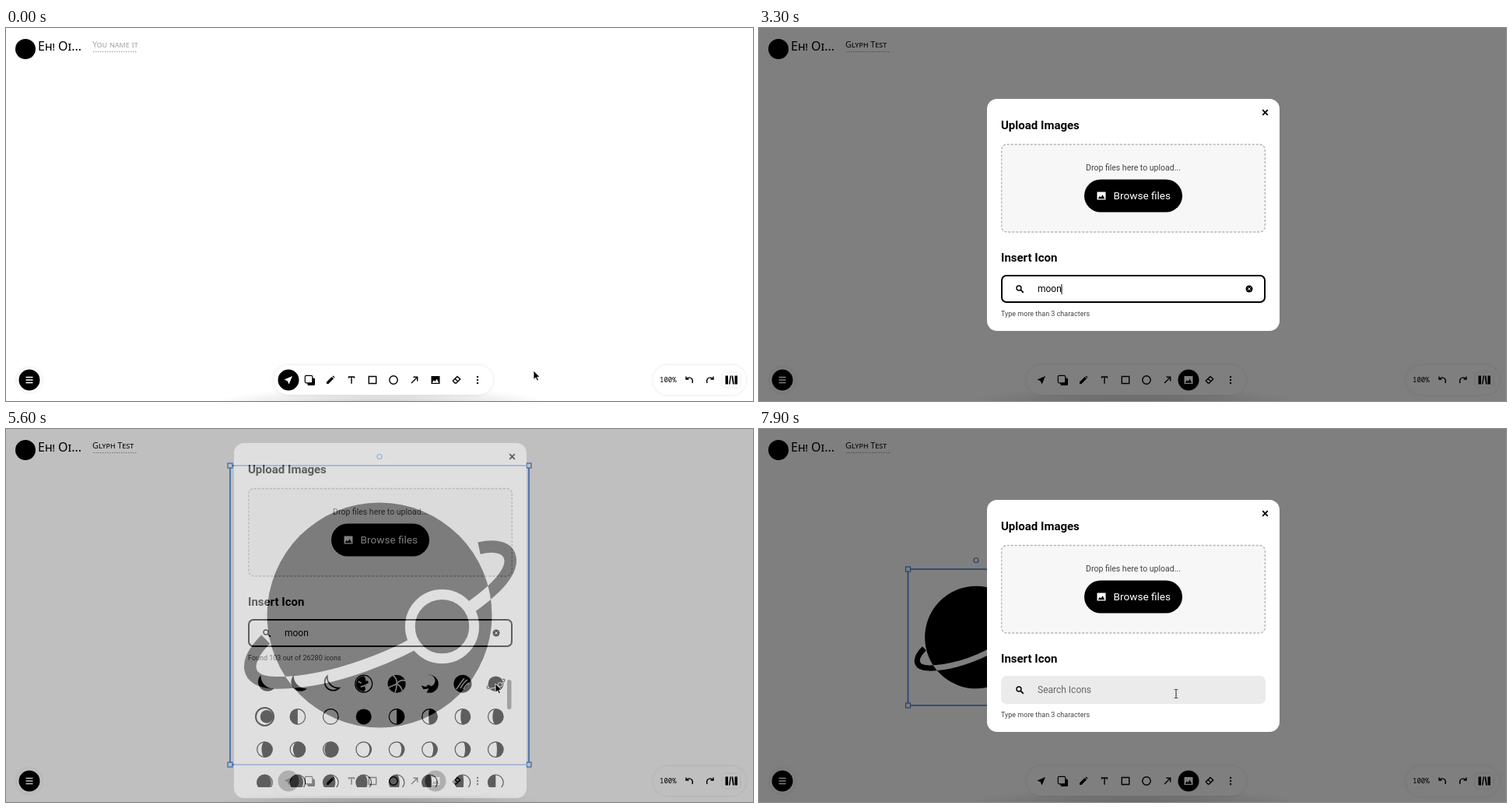
An HTML page that plays this animation: 960 px wide and 479 px high, repeating every 8000 ms.

```html
<!DOCTYPE html>
<html lang="en">
<head>
<meta charset="utf-8">
<title>Whiteboard icon search</title>
<style>
html, body { margin: 0; width: 100%; height: 100%; overflow: hidden; background: #fff; }
svg { display: block; }
text { font-family: Roboto, sans-serif; }
.hand text { font-family: "Noto Sans", sans-serif; font-variant: small-caps; }
.mono { font: 500 9px "Noto Sans Mono", monospace; }
.pill { fill: #fff; filter: drop-shadow(0 0 2px rgba(0, 0, 0, .1)); }
.line { fill: none; stroke: currentColor; stroke-width: 1.4; }
.solid { fill: currentColor; }
.head { font-size: 15px; font-weight: 700; }
.note { font-size: 9px; fill: #444; }
.ring { fill: #fff; stroke: #000; stroke-width: 1.2; }
.select { fill: none; stroke: #4684e0; stroke-width: 1.6; }
.grip { fill: #fff; stroke: #4684e0; stroke-width: 1.2; }
.pointer { fill: #000; stroke: #fff; stroke-width: .8; }
</style>
</head>
<body>
<svg id="stage" width="960" height="479" viewBox="0 0 960 479">
  <defs>
    <radialGradient id="shade">
      <stop offset=".2" stop-opacity=".16"/>
      <stop offset="1" stop-opacity="0"/>
    </radialGradient>
    <clipPath id="disc"><circle cx="105" cy="105" r="79"/></clipPath>
    <clipPath id="listClip"><rect x="312" y="291" width="332" height="151"/></clipPath>
    <path id="orbit" d="M25 122C9 138 10 152 32 152.5C72 153 122 132 149 113C174 97 198 80 197 66C196 56 184 56 175 58" fill="none" stroke-width="8.5"/>
    <g id="planet">
      <use href="#orbit" stroke="#000"/>
      <circle cx="105" cy="105" r="79"/>
      <use href="#orbit" stroke="#fff" clip-path="url(#disc)"/>
      <circle cx="149" cy="113" r="22.5" stroke="#fff" stroke-width="7"/>
    </g>
    <path id="picture" fill-rule="evenodd" d="M-5.500 -5H5.500V5H-5.500ZM-4.300 3.700H4.300L1.600 -1.200 -.7 2 -2.200 .2Z"/>
    <path id="doubleArrow" d="M-6 0L-2.500 -3.500V-1.200H2.500V-3.500L6 0 2.500 3.500V1.200H-2.500V3.500Z"/>
  </defs>

  <ellipse cx="482" cy="484" rx="220" ry="24" fill="url(#shade)"/>
  <g id="drawing">
    <use id="shape" href="#planet"/>
    <g id="selection"></g>
  </g>

  <g class="hand">
    <circle cx="25" cy="27" r="13"/>
    <text x="41" y="29" font-size="16">Eh! Oi...</text>
    <text id="name" x="111" y="25" font-size="11"></text>
    <path d="M112 30.5H169" stroke="#999" stroke-dasharray="1.5 1.5"/>
  </g>

  <circle cx="30" cy="452" r="16" class="pill"/>
  <circle cx="30" cy="452" r="13.5"/>
  <path d="M25.5 448.5h9M25.5 452h9M25.5 455.5h9" stroke="#fff" stroke-width="1.4"/>
  <rect x="344" y="433" width="282" height="38" rx="19" class="pill"/>
  <circle id="moveSpot" cx="363" cy="452" r="13.5"/>
  <circle id="imageSpot" cx="552" cy="452" r="13.5"/>
  <g id="tools"></g>
  <rect x="832" y="433" width="119" height="38" rx="19" class="pill"/>
  <text x="840" y="455.3" class="mono">100%</text>
  <g id="history"></g>
  <rect x="921" y="443" width="22" height="18" rx="3" class="pill"/>
  <path d="M924.5 446.5h3.5v11h-3.5zM936.5 446.5h3.5v11h-3.5zM930.5 446.5h1.500l-1.500 11h-1.500zM932.5 446.5h1.800l1.500 11h-1.800z"/>

  <rect id="dim" width="960" height="479"/>

  <g id="dialog">
    <rect id="panel" x="293" width="376" rx="13" fill="#fff"/>
    <path d="M647.2 14.2l6.6 6.6m0 -6.6l-6.6 6.6" class="line" style="stroke-width:1.8"/>
    <text x="311" y="39.4" class="head">Upload Images</text>
    <rect x="311.7" y="58.5" width="338.6" height="112.5" rx="7" fill="#f7f7f7" stroke="#b4b4b4" stroke-width="1.3" stroke-dasharray="3 2"/>
    <text x="481" y="92" font-size="10.5" text-anchor="middle" fill="#444">Drop files here to upload...</text>
    <rect x="418" y="103.5" width="126" height="42" rx="21"/>
    <use href="#picture" x="440" y="124.5" fill="#fff"/>
    <text x="455.5" y="129.3" font-size="13.6" fill="#fff">Browse files</text>
    <text x="311" y="209.3" class="head">Insert Icon</text>
    <rect id="field" x="312" y="227" width="338" height="34" rx="6" stroke-width="2"/>
    <circle cx="334" cy="243" r="3" class="line"/>
    <path d="M336.3 245.3l3.5 3.5" class="line" style="stroke-width:1.8"/>
    <text id="query" x="358" y="248.3" font-size="12"></text>
    <path id="caret" d="M389 238v13" stroke="#000"/>
    <g id="clear">
      <circle cx="630" cy="244" r="4.5"/>
      <path d="M628.3 242.3l3.4 3.4m0 -3.4l-3.4 3.4" stroke="#fff"/>
    </g>
    <text id="hint" x="311" y="278.7" class="note"></text>
    <g id="results">
      <g clip-path="url(#listClip)"><g id="list"></g></g>
      <rect id="thumb" x="644" width="5.5" height="38" rx="2.7" fill="#858585"/>
    </g>
  </g>

  <g id="pointer" class="pointer">
    <path id="arrow" d="M0 0V11.5L2.7 9 4.5 13 6.4 12.1 4.6 8.3H8Z"/>
    <path id="ibeam" d="M-2.5 -6H-.6L0 -5.4 .6 -6H2.500V-5H.6V5H2.500V6H.6L0 5.400 -.6 6H-2.500V5H-.6V-5H-2.500Z" style="stroke-width:.3"/>
    <path id="finger" d="M-3 -5Q-1.800 -6.500 -.8 -5L1 -.8Q3.500 -2 5 .8L6 4 4.500 7H-.5L-4.500 2.500Q-5 .8 -3.200 1L-1.600 2Z" style="fill:#fff;stroke:#000;stroke-width:1.1"/>
    <use id="resize" href="#doubleArrow"/>
    <use id="corner" href="#doubleArrow" transform="rotate(45)"/>
  </g>
</svg>
<script>
const $ = id => document.getElementById(id);
const set = (id, attrs) => { for (const k in attrs) $(id).setAttribute(k, attrs[k]); };
const show = (id, on) => { $(id).style.display = on ? '' : 'none'; };
const at = (x, y, body, extra = '') => `<g transform="translate(${x} ${y})" ${extra}>${body}</g>`;
const line = d => `<path class="line" d="${d}"/>`;
const solid = d => `<path class="solid" d="${d}"/>`;

// Toolbar
const toolIcons = {
  move: solid('M5 -5L-5.500 -.5 -1.300 1.200 .6 5.500Z'),
  pages: '<rect x="-2.5" y="-2.5" width="9.5" height="9.5" rx="1.5"/>' +
    '<rect x="-5.7" y="-5.7" width="9.5" height="9.5" rx="1.5" class="ring"/>',
  pencil: solid('M-5 5V2.600L1.700 -4.100 4.100 -1.700 -2.600 5ZM2.500 -4.800L3.500 -5.500 5.500 -3.500 4.800 -2.500Z'),
  text: line('M-3.500 -2.200V-4H3.500V-2.200M0 -4V4.700'),
  box: line('M-4.700 -4.500H4.700V4.500H-4.700Z'),
  oval: '<circle r="5.2" class="line"/>',
  arrow: line('M-4 4L3.500 -3.500M-1.500 -3.700H3.700V1.500'),
  image: '<use href="#picture" class="solid"/>',
  eraser: line('M-4.700 1L1 -4.500 4.700 -1 -.5 4H-2ZM-2 -1.500L2 2'),
  more: [-4, 0, 4].map(y => `<circle cy="${y}" r="1.2"/>`).join('')
};
$('tools').innerHTML = Object.entries(toolIcons)
  .map(([id, body], i) => at(363 + 27 * i, 452, body, `id="tool-${id}"`)).join('') +
  at(579, 452, line('M-5 -3.500H5M-2 -3.500V-5H2V-3.500M-3.700 -3V5H3.700V-3M-1.300 -1V3M1.300 -1V3'), 'id="trash"');

const turn = line('M-4 -4.500V-1H-.5M-4 -1Q0 -5 3.500 -1.500Q5 .5 4 4');
$('history').innerHTML = at(878, 452, turn) + at(905, 452, `<g transform="scale(-1 1)">${turn}</g>`);

// Result icons
const ring = '<circle r="9.8" class="ring"/>';
const full = '<circle r="10"/>';
const phase = (side, part, ringed) => {
  const rx = Math.abs(1 - 2 * part) * 10;
  return (ringed ? ring : '') + `<path transform="scale(${side} 1)" d="M0 -10A10 10 0 0 1 0 10A${rx} 10 0 0 ${part > .5 ? 1 : 0} 0 -10Z"/>`;
};
const phases = (count, side, from, to, ringed) => Array.from({ length: count },
  (_, i) => phase(side, from + (to - from) * i / Math.max(1, count - 1), ringed));
const L = -1, R = 1;
const crescent = 'M-5 -11A12 12 0 1 0 12 6A16 16 0 0 1 -5 -11Z';
const moon = `<path d="${crescent}"/>`;
const moonLine = `<path d="${crescent}" class="ring" style="stroke-width:1.8" transform="scale(.9)"/>`;
const cloud = 'M-7 7A4.500 4.500 0 0 1 -6 -2A6 6 0 0 1 5 -3A5 5 0 0 1 6 7Z';
const planet = '<use href="#planet" transform="translate(-13 -13) scale(.125)"/>';
const scar = d => `<path d="${d}" fill="none" stroke="#fff" stroke-width="1.7"/>`;
const bigDisc = '<circle r="11.5"/>';
const icons = [
  `<path d="${cloud}" class="ring"/>`,
  '<path d="M-9 2H9A5 5 0 0 0 5 -6H-6Z"/>' + line('M-6 4l-2 5M-1 4l-2 5M4 4l-2 5M9 4l-2 5'),
  `<path d="${cloud}"/><circle cx="8" cy="-1" r="4"/>`,
  moon, moonLine, `<g transform="scale(.85)">${moon}</g>`, full, moonLine,
  moon, moon, moonLine,
  '<circle r="11" class="ring"/>' + phase(L, .65) + scar('M-7 -3l4 2M-4 4l6 -2 1 4') + '<circle cx="4" cy="-2" r="2"/>',
  bigDisc + scar('M-11 5Q-4 2 0 0Q0 6 -2 11M-5 -11Q1 -6 0 0Q5 -6 11 -4M0 0Q6 3 7 9'),
  '<path d="M-3 -11A11.500 11.500 0 1 1 -4 11L-1 6 -8 7 -11 2 -5 4 -2 1 2 3A6 6 0 0 0 -3 -11Z"/>',
  bigDisc + scar('M-8 7Q-3 -1 2 -7M-3 6Q2 -3 6 -5M1 7Q4 1 8 -1'),
  planet,
  '<circle r="11.5" class="ring" style="stroke-width:2"/><circle cx="2.5" r="8.3"/>',
  phase(L, .5, true), ring, full, ...phases(4, R, .5, .7, true),
  ...phases(3, R, .7, .9, true), ...phases(5, R, .12, .42, true),
  ...phases(8, L, .92, .5, true),
  ...phases(5, L, .42, .12, true), phase(R, .5), full, ring,
  ...phases(7, L, .5, .12), phase(L, .88),
  ...phases(5, L, .85, .55), phase(R, .45), ...phases(2, R, .2, .25),
  ...phases(3, R, .22, .4), ...phases(5, R, .52, .7),
  ...phases(8, R, .72, .95),
  ...phases(8, L, .1, .8, true), ...phases(8, R, .8, .1, true),
  moon, moonLine, ...phases(5, L, .3, .6)
];
$('list').innerHTML = icons.map((icon, i) =>
  at(332.5 + 42.4 * (i % 8), 314 + 42.2 * Math.floor(i / 8), icon)).join('');

// Motion: each key is [time, ...values]; numbers are interpolated, names are held
const searchStart = 2800, resultsAt = 3500, insertAt = 5600, closedAt = 5700;
const cursorKeys = [
  [100, 678, 440, 'arrow'], [300, 500, 300, 'arrow'], [500, 60, 16, 'arrow'], [600, 125, 22, 'ibeam'],
  [700, 140, 21, 'ibeam'], [900, 140, 21, ''], [1500, 150, 30, 'arrow'], [1900, 551, 455, 'arrow'],
  [2300, 551, 455, 'arrow'], [2600, 490, 336, 'ibeam'], [3000, 490, 336, ''],
  [3500, 490, 336, 'finger'], [3700, 496, 311, 'finger'], [4700, 496, 311, 'finger'],
  [5000, 496, 350, 'finger'], [5300, 629, 327, 'finger'], [5600, 629, 327, 'arrow'],
  [5800, 672, 290, 'resize'], [5900, 672, 290, 'resize'], [6000, 560, 256, 'resize'],
  [6100, 497, 238, 'resize'], [6300, 475, 185, 'arrow'], [6500, 378, 313, 'arrow'],
  [7000, 378, 313, 'arrow'], [7100, 416, 375, 'arrow'], [7200, 401, 390, 'corner'],
  [7400, 366, 355, 'corner'], [7500, 410, 380, 'arrow'], [7700, 551, 455, 'arrow'],
  [7800, 545, 400, 'arrow'], [7900, 536, 340, 'ibeam']
];
const boxKeys = [
  [5900, 288, 47, 384], [6000, 288, 47, 272], [6100, 288, 47, 210], [6300, 288, 47, 210],
  [6500, 191.5, 180, 210], [7200, 191.5, 180, 210], [7400, 191.5, 180, 175]
];
const openKeys = [[2000, 0], [2100, .45], [2200, .88], [2300, 1], [5500, 1], [closedAt, 0], [7600, 0], [7700, .7], [7800, 1]];
const scrollKeys = [[3600, 0], [4000, 214], [4200, 320], [4300, 320], [4800, 10], [5000, 26], [5100, 47]];

function track(keys, t) {
  const next = keys.findIndex(k => k[0] > t);
  if (next <= 0) return keys[next ? keys.length - 1 : 0].slice(1);
  const a = keys[next - 1], b = keys[next], p = (t - a[0]) / (b[0] - a[0]);
  return a.slice(1).map((v, i) => typeof v === 'number' ? v + (b[i + 1] - v) * p : v);
}
const typed = (text, t, start, step, each = 1) =>
  text.slice(0, Math.max(0, Math.floor((t - start) / step) + 1) * each);

function drawBox(t) {
  show('drawing', t >= insertAt);
  const [x, y, s] = track(boxKeys, t);
  set('shape', { transform: `translate(${x} ${y}) scale(${s / 210})` });
  const grip = (gx, gy) => `<rect x="${gx - 3}" y="${gy - 3}" width="6" height="6" class="grip"/>`;
  $('selection').innerHTML = `<rect x="${x}" y="${y}" width="${s}" height="${s}" class="select"/>` +
    grip(x, y) + grip(x + s, y) + grip(x, y + s) + grip(x + s, y + s) +
    `<circle cx="${x + s / 2}" cy="${y - 11.5}" r="3" class="grip"/>`;
}

function drawTools(t, open) {
  const picked = open > .4;
  set('moveSpot', { opacity: 1 - open });
  set('imageSpot', { opacity: open });
  $('tool-move').style.color = picked ? '#000' : '#fff';
  $('tool-image').style.color = picked ? '#fff' : '#000';
  const trash = t >= insertAt && !picked;
  show('trash', trash);
  show('tool-eraser', !trash);
}

function drawDialog(t, open) {
  const [scroll] = track(scrollKeys, t);
  const focused = t >= searchStart && t < closedAt;
  const found = t >= resultsAt && t < closedAt;
  const height = found ? 456 : 298;
  const query = t < closedAt ? typed('moon', t, 3000, 100) : '';
  set('dim', { opacity: open / 2 });
  set('dialog', { opacity: open, transform: `translate(0 ${240 - height / 2 + (1 - open) * 12})` });
  set('panel', { height });
  set('field', { fill: focused ? '#fff' : '#ebebeb', stroke: focused ? '#000' : '#ebebeb' });
  $('query').textContent = query || 'Search Icons';
  set('query', { fill: query ? '#000' : '#666' });
  set('caret', { transform: `translate(${(query.length - 4) * 7.7} 0)` });
  show('caret', focused && (t + 280) % 1060 < 530);
  show('clear', query);
  $('hint').textContent = found ? 'Found 103 out of 26280 icons' : 'Type more than 3 characters';
  show('results', found);
  set('list', { transform: `translate(0 ${-scroll})` });
  set('thumb', { y: 291 + scroll * .276 });
}

function render(t) {
  const [open] = track(openKeys, t);
  const name = typed('Glyph Test', t, 900, 100, 2);
  $('name').textContent = name || 'You name it';
  set('name', { fill: name ? '#111' : '#aaa' });
  drawBox(t);
  drawTools(t, open);
  drawDialog(t, open);
  const [x, y, kind] = track(cursorKeys, t);
  set('pointer', { transform: `translate(${x} ${y})` });
  ['arrow', 'ibeam', 'finger', 'resize', 'corner'].forEach(id => show(id, id === kind));
}

const start = performance.now();
function tick() {
  const t = (performance.now() - start) % 8000;
  render(Math.floor(t / 100) * 100);
  requestAnimationFrame(tick);
}
tick();
</script>
</body>
</html>
```
